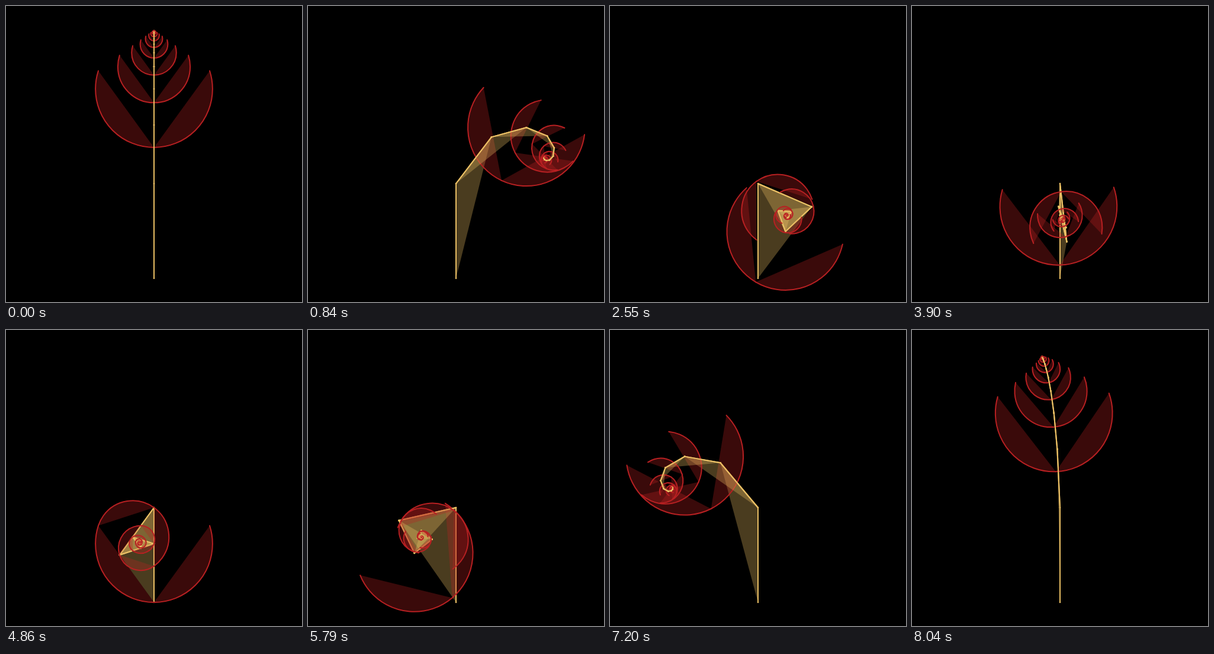
Animation, 500 px wide and 500 px high, one loop 8070 ms. Source, as an HTML page with a canvas:

```html
<!DOCTYPE html>
<html>
<head>
<meta charset="utf-8">
<title>Golden spiral fern</title>
<style>
html, body { margin: 0; background: #000; overflow: hidden; }
canvas { display: block; }
</style>
</head>
<body>
<canvas id="stage" width="500" height="500"></canvas>
<script>
const ctx = document.getElementById('stage').getContext('2d');
const RATIO = (Math.sqrt(5) - 1) / 2;
const LEVELS = 12;
const STEP_MS = 30, STEPS = 269;
const TURN = Math.PI / 135;      // bend added per step
const SWEEP = Math.PI * 0.6;     // each half of a leaf
const GOLD = '#ebc065', RED = '#b82022';

function paint(path, color) {
  ctx.fillStyle = ctx.strokeStyle = color;
  ctx.globalAlpha = 0.314;
  ctx.fill(path);
  ctx.globalAlpha = 1;
  ctx.stroke(path);
}

// Every branch bends by the same angle and shrinks by the golden ratio.
function stemPoints(bend) {
  const points = [{ x: 250, y: 460 }];
  for (let i = 0, len = 160; i < LEVELS + 2; i++, len *= RATIO) {
    const { x, y } = points[i];
    points.push({ x: x + len * Math.sin(i * bend), y: y - len * Math.cos(i * bend) });
  }
  return points;
}

function drawStem(points) {
  const path = new Path2D();
  points.forEach(p => path.lineTo(p.x, p.y));
  paint(path, GOLD);
  for (const p of points) {
    ctx.beginPath();
    ctx.arc(p.x, p.y, 1.3, 0, 2 * Math.PI);
    ctx.fill();
  }
}

// Two arcs that start on the side facing the root.
function drawLeaf(root, center, radius) {
  const back = Math.atan2(root.y - center.y, root.x - center.x);
  for (const side of [-1, 1]) {
    const path = new Path2D();
    path.arc(center.x, center.y, radius, back, back + side * SWEEP, side < 0);
    paint(path, RED);
  }
}

function draw(now) {
  const step = Math.floor(now / STEP_MS) % STEPS;
  const points = stemPoints(step * TURN);
  ctx.clearRect(0, 0, 500, 500);
  ctx.lineWidth = 2;
  ctx.lineCap = ctx.lineJoin = 'round';
  for (let k = 0; k < LEVELS; k++) {
    drawStem(points.slice(k, k + 3));
    drawLeaf(points[k], points[k + 3] || points[k + 2], 160 * RATIO ** (k + 1));
  }
}

const start = performance.now();
function tick() {
  draw(performance.now() - start);
  requestAnimationFrame(tick);
}
tick();
</script>
</body>
</html>
```
